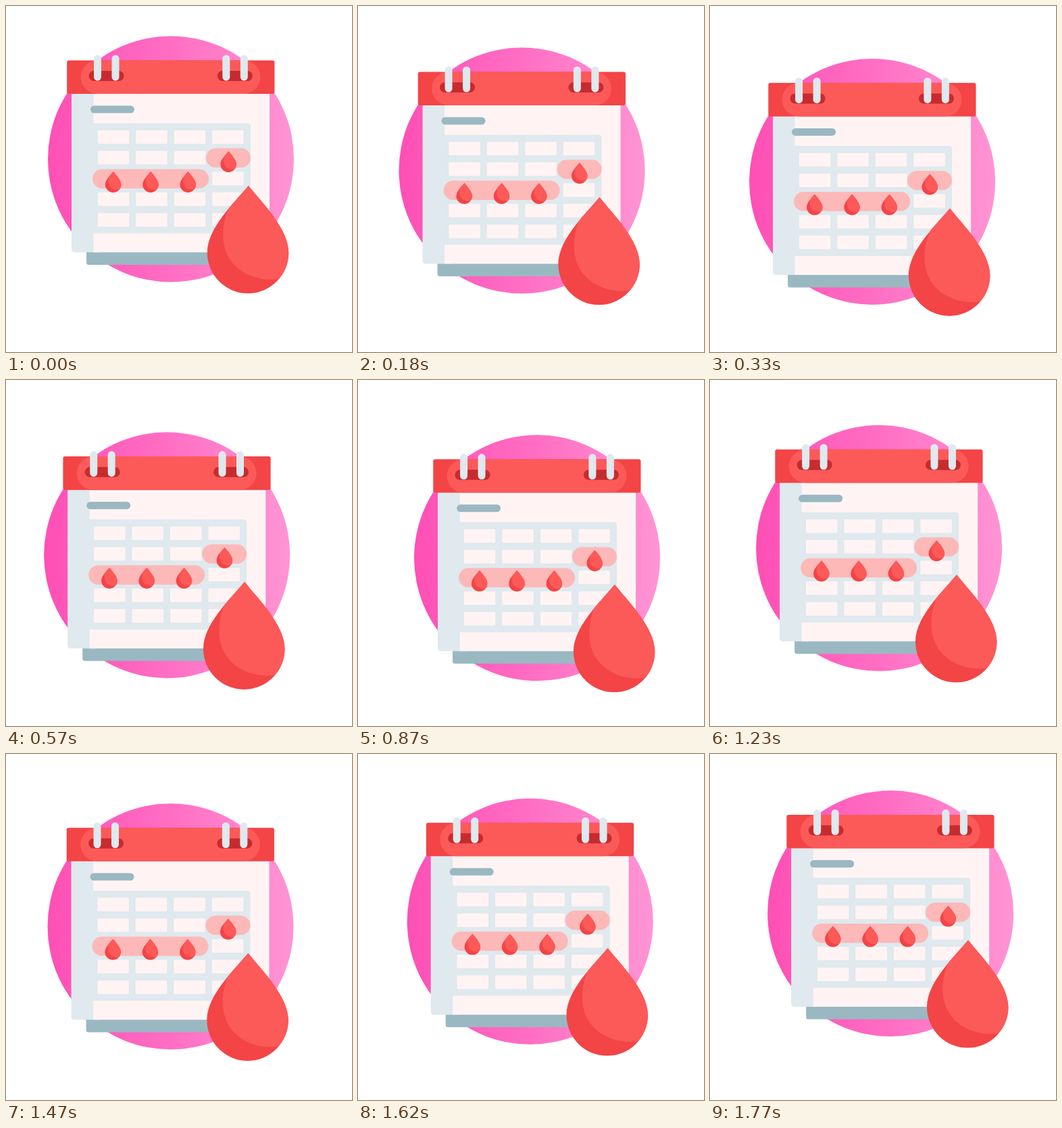
An HTML page that plays this animation: 512x512 px, repeating every 1.8 s.

```html
<!DOCTYPE html>
<html lang="en">
<head>
<meta charset="utf-8">
<title>Calendar</title>
<style>
  html, body { margin: 0; width: 100%; height: 100%; overflow: hidden; background: #fff; }
  svg { display: block; width: 100vw; height: 100vh; }
  .red { fill: #fc5959; }
  .deep { fill: #f34446; }
  .slot { fill: #c62b2f; }
  .pale { fill: #dfe9ee; }
  .paper { fill: #fff4f3; }
  .steel { fill: #9ab8c2; }
  .blush { fill: #fdb8b8; }
</style>
</head>
<body>
<svg viewBox="0 0 512 512">
  <defs>
    <linearGradient id="pink">
      <stop offset="0" stop-color="#ff4fb5"/>
      <stop offset=".5" stop-color="#ff6ec3"/>
      <stop offset="1" stop-color="#ff95d4"/>
    </linearGradient>
    <path id="shape" d="M0 0C20 25 59.5 64 59.5 99A60.25 60.25 0 0 1-61 99C-61 63-22 26 0 0Z"/>
    <clipPath id="inside"><use href="#shape"/></clipPath>
    <g id="drop">
      <use href="#shape" class="deep"/>
      <path class="red" clip-path="url(#inside)"
        d="M0-5L70 60V110L44 138C22 141-2 135-19 119C-41 98-42 65-30 34L-25 10Z"/>
    </g>
    <rect id="ring" class="pale" x="130" y="72.5" width="11" height="38" rx="5.5"/>
    <g id="rings">
      <rect class="slot" x="122.5" y="96" width="52" height="15" rx="7.5"/>
      <use href="#ring"/>
      <use href="#ring" x="26.5"/>
    </g>
  </defs>

  <g id="scene">
    <circle cx="244" cy="226.5" r="182" fill="url(#pink)"/>
    <rect class="steel" x="119" y="350" width="225" height="33" rx="3.5"/>
    <path class="pale" d="M97 128H140V364.5H102Q97 364.5 97 359.5Z"/>
    <path class="paper" d="M129.5 128H390V364.5H129.5Z"/>
    <rect class="steel" x="125" y="147.5" width="65" height="11" rx="5.5"/>

    <path class="pale" d="M129 173.5H357Q362 173.5 362 178.5V336.5H129Z"/>
    <g id="cells" class="paper"></g>
    <rect class="blush" x="128" y="241.5" width="172" height="28.5" rx="14.25"/>
    <rect class="blush" x="296" y="210.5" width="66" height="28.5" rx="14.25"/>
    <g id="drops"></g>

    <rect class="deep" x="90.2" y="80.4" width="307.2" height="49.6" rx="3"/>
    <rect class="red" x="110.5" y="80.4" width="266" height="49.6" rx="25"/>
    <use href="#rings"/>
    <use href="#rings" x="190.3"/>
    <use href="#drop" x="358.8" y="266"/>
  </g>
</svg>
<script>
  const byId = id => document.getElementById(id);

  function add(parent, tag, attrs) {
    const el = document.createElementNS("http://www.w3.org/2000/svg", tag);
    for (const key in attrs) el.setAttribute(key, attrs[key]);
    byId(parent).append(el);
  }

  function addDrop(x, y) {
    add("drops", "use", { href: "#drop", transform: `translate(${x} ${y}) scale(.195)` });
  }

  for (let row = 0; row < 5; row++)
    for (let col = 0; col < 4; col++)
      add("cells", "rect", {
        x: 135.8 + col * 56.5, y: 184 + row * 30.6, width: 46.4, height: 20, rx: 1
      });

  for (let day = 0; day < 3; day++) addDrop(158.8 + day * 55.3, 245);
  addDrop(329.3, 215);

  // Turning points of the drift: [ms, offset]
  const driftX = [[0, 0], [540, -5.8], [590, -5.8], [1000, 29], [1350, -2], [1400, -2], [1870, 26.2]];
  const driftY = [[0, 0], [360, 34], [520, 32], [780, 40], [1125, 20], [1440, 29], [1920, 4]];

  // Cosine ease from one turning point to the next
  function drift(turns, t) {
    const next = turns.findIndex(([time]) => time > t);
    const [t0, v0] = turns[next - 1], [t1, v1] = turns[next];
    return v0 + (v1 - v0) * (1 - Math.cos(Math.PI * (t - t0) / (t1 - t0))) / 2;
  }

  const LOOP = 1800, STEP = 30;
  const start = performance.now();

  function draw(now) {
    const t = Math.floor(Math.max(0, now - start) % LOOP / STEP) * STEP;
    byId("scene").setAttribute("transform", `translate(${drift(driftX, t)} ${drift(driftY, t)})`);
    requestAnimationFrame(draw);
  }
  draw(start);
</script>
</body>
</html>
```
